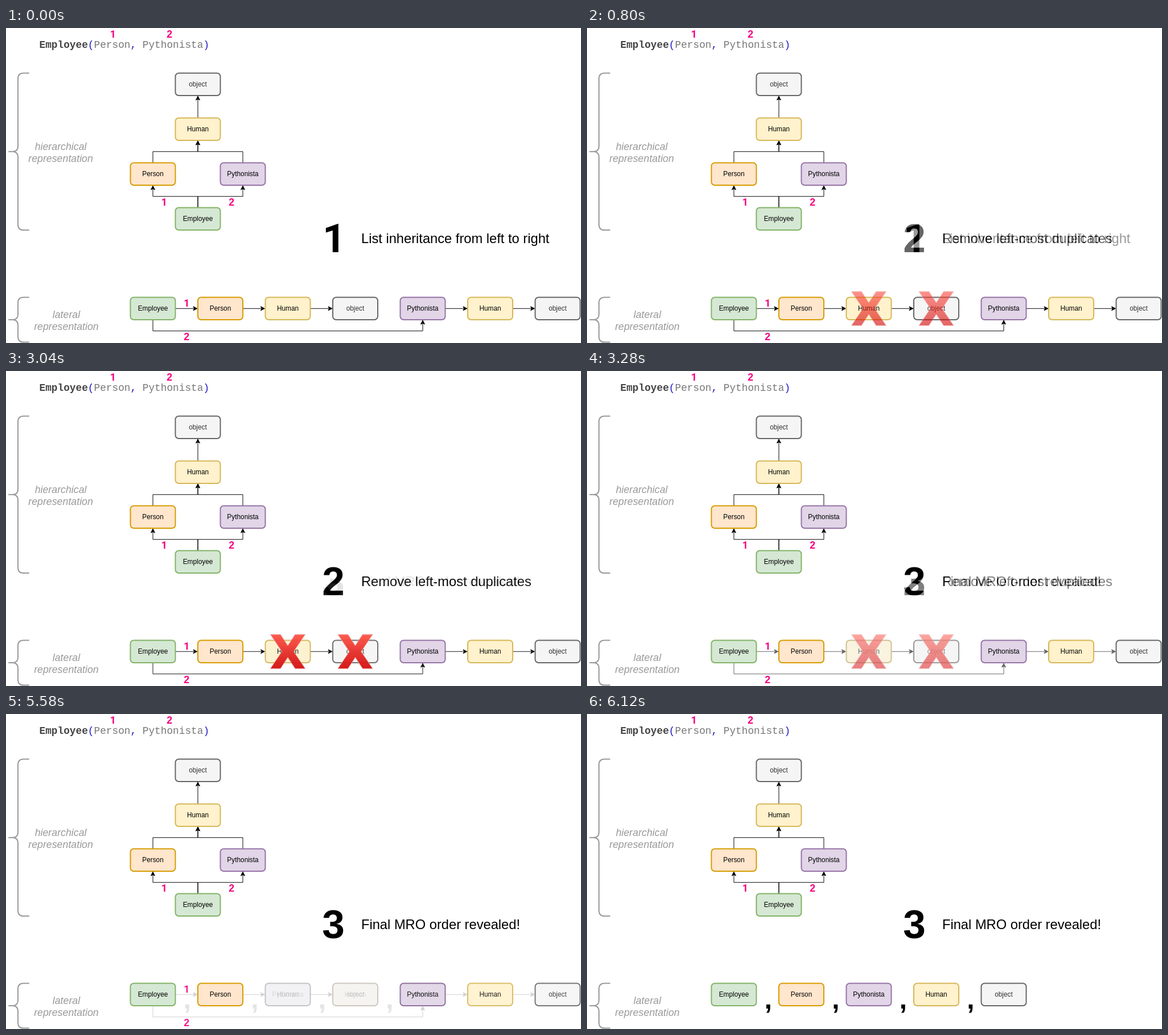
Write an HTML page that moves like this. It is 1010 px wide and 555 px high and loops after 8 s.

```html
<!DOCTYPE html>
<html lang="en">
<head>
<meta charset="utf-8">
<title>Inheritance order</title>
<style>
  html, body { margin: 0; width: 100%; height: 100%; overflow: hidden; background: #fff; }
  svg { display: block; width: 1010px; height: 555px; }
  text { font-family: "Liberation Sans", Arial, sans-serif; text-anchor: middle; white-space: pre; }
  .label { font-size: 12px; }
  .order { font-size: 18px; font-weight: bold; fill: #f50082; }
  .side { font-size: 18px; font-style: italic; fill: #999; }
  .code { font-family: "Liberation Mono", "Courier New", monospace; font-size: 18px; text-anchor: start; fill: #777; }
  .code .name { font-weight: bold; fill: #444; }
  .code .mark { fill: #1a1ac8; }
  .step { font-size: 72px; font-weight: bold; }
  .hint { font-size: 24px; text-anchor: start; }
  .comma { font-size: 48px; font-weight: bold; }
  .one { font-family: Roboto, "Liberation Sans", sans-serif; }
  .brace { fill: none; stroke: #999; stroke-width: 2; }
</style>
</head>
<body>
<svg viewBox="0 0 1010 555">
  <defs>
    <linearGradient id="red" x1="0" y1="0" x2="0" y2="1">
      <stop offset="0" stop-color="#ff4a3d"/>
      <stop offset="1" stop-color="#d00000"/>
    </linearGradient>
  </defs>
  <!-- one unit of the diagram grid is 0.9875 px -->
  <g id="stage" transform="translate(218.5 79.5) scale(.9875)"></g>
</svg>
<script>
const LOOP = 8000, FIRST_FADE = 500, FADE_GAP = 2540, TICK = 60, TICKS = 10;
const FADED = "#ccc";

// name: fill, stroke, text
const kinds = {
  object: ["#f5f5f5", "#666", "#333"],
  Human: ["#fff2cc", "#d6b656", "#000"],
  Person: ["#ffe6cc", "#d79b00", "#000"],
  Pythonista: ["#e1d5e7", "#9673a6", "#000"],
  Employee: ["#d5e8d4", "#82b366", "#000"]
};

const text = (cls, x, y, content) => `<text class="${cls}" x="${x}" y="${y}">${content}</text>`;

function box(name, x, y, faded) {
  const [fill, stroke, ink] = faded ? ["#f5f5f5", FADED, FADED] : kinds[name];
  return `<rect x="${x}" y="${y}" width="80" height="40" rx="6" fill="${fill}" stroke="${stroke}" stroke-width="2"/>
    <text class="label" x="${x + 40}" y="${y + 24.2}" fill="${ink}">${name}</text>`;
}

// A line along the path d, with an arrow head at its end (x, y)
function arrow(d, x, y, angle, color = "#000") {
  return `<path d="${d}" fill="none" stroke="${color}"/>
    <path d="M-1.1 0l-7 -3.5 1.75 3.5 -1.75 3.5z" transform="translate(${x} ${y}) rotate(${angle})"
      fill="${color}" stroke="${color}"/>`;
}

const up = (d, x, y, color) => arrow(`${d}V${y + 5}`, x, y, -90, color);
const right = (x, color) => arrow(`M${x} 420H${x + 35}`, x + 40, 420, 0, color);

const order = (n, x, y) => text(n === 1 ? "order one" : "order", x, y + 6.5, n);

const brace = (top, bottom) => {
  const mid = (top + bottom) / 2;
  return `<path class="brace" d="M-180 ${top}H-190Q-200 ${top} -200 ${top + 10}V${mid - 10}
    Q-200 ${mid} -210 ${mid}H-217H-210Q-200 ${mid} -200 ${mid + 10}
    V${bottom - 10}Q-200 ${bottom} -190 ${bottom}H-180"/>`;
};

const cross = x => `<path transform="translate(${x} 420)" fill="url(#red)" stroke="#eda0a0"
  d="M-31 -30.5h18L0 -10.5 13 -30.5h18L10.5 0 31 30.5h-18L0 10.5 -13 30.5h-18L-10.5 0z"/>`;

const heading = (n, hint) =>
  (n === 1 ? text("step one", 362.5, 319.7, n) : text("step", 361, 319.7, n)) + text("hint", 410.6, 303.6, hint);

function chain(faded) {
  const color = faded ? FADED : "#000";
  const names = ["Employee", "Person", "Human", "object", "Pythonista", "Human", "object"];
  return [80, 200, 320, 560, 680].map(x => right(x, color)).join("") +
    up("M40 440V460H520", 520, 440, color) +
    names.map((name, i) => box(name, i * 120, 400, faded && (i === 2 || i === 3))).join("") +
    order(1, 100, 410) + order(2, 100, 470);
}

const result = ["Employee", "Person", "Pythonista", "Human", "object"]
  .map((name, i) => box(name, i * 120, 400) + (i ? text("comma", i * 120 - 19, 445, ",") : "")).join("");

const last = heading(3, "Final MRO order revealed!");
const scenes = [
  heading(1, "List inheritance from left to right") + chain(false),
  heading(2, "Remove left-most duplicates") + chain(false) + cross(280) + cross(400),
  last + chain(true),
  last + result
];

const fixed =
  `<text class="code" x="-162" y="-45"><tspan class="name">Employee</tspan><tspan class="mark">(</tspan>Person<tspan
    class="mark">,</tspan> Pythonista<tspan class="mark">)</tspan></text>` +
  order(1, -31, -69.5) + order(2, 69.5, -69.5) +
  brace(0, 280) + brace(400, 480) +
  text("side", -124, 137.2, "hierarchical") + text("side", -124, 158.4, "representation") +
  text("side", -114, 437.2, "lateral") + text("side", -114, 458.4, "representation") +
  up("M120 80", 120, 40) +
  up("M40 160V140H120", 120, 120) + up("M200 160V140H120", 120, 120) +
  up("M120 240V220H40", 40, 200) + up("M120 240V220H200", 200, 200) +
  box("object", 80, 0) + box("Human", 80, 80) + box("Person", 0, 160) +
  box("Pythonista", 160, 160) + box("Employee", 80, 240) +
  order(1, 60, 230) + order(2, 180, 230);

// Each scene has a white ground, so raising its opacity dissolves the one below
const stage = document.getElementById("stage");
stage.innerHTML = scenes.map(scene =>
  `<g class="scene"><rect x="-10" y="245" width="830" height="240" fill="#fff"/>${scene}</g>`).join("") + fixed;
const layers = [...stage.querySelectorAll(".scene")];

const start = performance.now();
function draw() {
  const t = Math.max(0, performance.now() - start) % LOOP;
  layers.forEach((layer, i) => {
    if (!i) return;
    const tick = Math.floor((t - FIRST_FADE - (i - 1) * FADE_GAP) / TICK) + 1;
    layer.setAttribute("opacity", Math.min(1, Math.max(0, tick / TICKS)));
  });
  requestAnimationFrame(draw);
}
draw();
</script>
</body>
</html>
```
